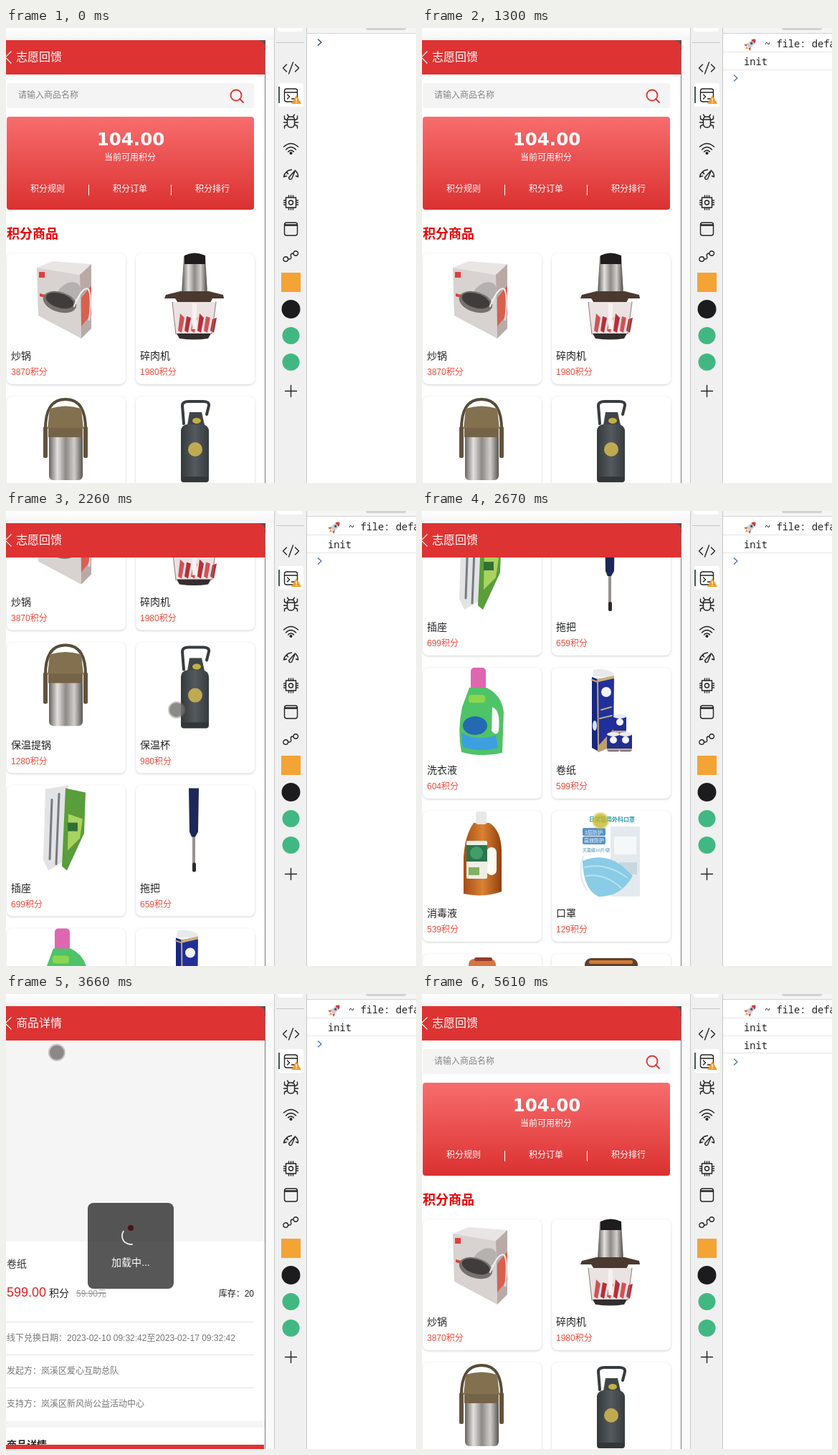
Recreate the animation shown at these times as an HTML page with a canvas. Size 572x636 px, loop 6.08 s.

```html
<!DOCTYPE html>
<html lang="zh">
<head>
<meta charset="utf-8">
<style>
html, body { margin: 0; width: 100%; height: 100%; overflow: hidden; background: #fff; }
canvas { display: block; width: 100vw; height: 100vh; }
</style>
</head>
<body>
<canvas id="stage" width="572" height="636"></canvas>
<script>
const c = document.getElementById('stage').getContext('2d');
const LOOP = 6080;
const SANS = '"Liberation Sans", "Noto Sans CJK SC", "Noto Sans CJK", sans-serif';
const MONO = '"Noto Sans Mono", "DejaVu Sans Mono", monospace';
const RED = '#dd3333';

// Drawing helpers
function rect(x, y, w, h, fill, r = 0) {
  c.fillStyle = fill;
  c.beginPath();
  c.roundRect(x, y, w, h, r);
  c.fill();
}
function disc(x, y, rx, fill, ry = rx, turn = 0) {
  c.fillStyle = fill;
  c.beginPath();
  c.ellipse(x, y, rx, ry, turn, 0, 7);
  c.fill();
}
function shape(path, fill) {
  c.fillStyle = fill;
  c.fill(new Path2D(path));
}
function line(path, color = '#222', width = 1.4) {
  c.strokeStyle = color;
  c.lineWidth = width;
  c.stroke(new Path2D(path));
}
function text(s, x, y, size, fill, { align = 'left', weight = '', font = SANS } = {}) {
  c.font = `${weight} ${size}px ${font}`;
  c.textAlign = align;
  c.fillStyle = fill;
  c.fillText(s, x, y);
}
function fade(stops, x0, y0, x1, y1) {
  const g = c.createLinearGradient(x0, y0, x1, y1);
  stops.forEach((s, i) => g.addColorStop(i / (stops.length - 1), s));
  return g;
}
function at(x, y, scale, draw) {
  c.save();
  c.translate(x, y);
  c.scale(scale, scale);
  draw();
  c.restore();
}

// Piecewise linear track: rows of [time, ...values]
function track(keys, t) {
  if (t <= keys[0][0]) return keys[0].slice(1);
  for (let i = 1; i < keys.length; i++) {
    const a = keys[i - 1], b = keys[i];
    if (t < b[0]) {
      const k = (t - a[0]) / (b[0] - a[0]);
      return a.slice(1).map((v, j) => v + (b[j + 1] - v) * k);
    }
  }
  return keys[keys.length - 1].slice(1);
}

// Product pictures, centred on x = 0 with the top at y = 0
const steel = (x0, x1) => fade(['#66625f', '#e3e1df', '#8d8986', '#d0cecc', '#59544f'], x0, 0, x1, 0);

function panBox() {
  shape('M-40 20L-18 11L36 15L20 30Z', '#e9e5e4');
  shape('M-40 20L20 30L22 119L-38 87Z', '#d8d2d1');
  shape('M20 30L36 15L36 105L22 119Z', '#b9aaa8');
  shape('M22 62L36 45L36 85L22 102Z', '#d9604f');
  rect(-37, 26, 8, 8, '#dc4038');
  shape('M-36 56L-24 59L-24 63L-36 60Z', '#dc4038');
  disc(4, 56, 19, '#b5b1ae', 13, -.7);
  disc(-8, 68, 24, '#77716e', 14, .3);
  disc(-8, 66, 20, '#403c3b', 10, .3);
  line('M12 74Q24 45 32 50Q37 60 33 93', '#eee', 2);
}
function blender() {
  shape('M-15 4Q0 -4 15 4L18 56H-18Z', steel(-17, 17));
  shape('M-14 3Q0 -4 15 3L15 15H-14Z', '#1e1c1c');
  shape('M-40 58L-20 53H20L40 58L41 63H25L22 69H-23L-27 63H-42Z', '#4b3930');
  shape('M-31 68H30L24 113Q0 120 -26 113Z', '#ebe2e2');
  for (let i = 0; i < 6; i++) {
    const x = -23 + i * 9;
    shape(`M${x} 108L${x + 3} ${84 + (i % 3) * 4}L${x + 9} 90L${x + 5} 111Z`, i % 2 ? '#b72f38' : '#cf5258');
  }
  rect(-3, 70, 6, 36, '#f6f2f2');
  shape('M-25 112H23L19 119Q0 122 -21 119Z', '#332e2d');
  line('M-31 68L-26 113M30 68L24 113', '#8b7b75', 1);
}
function foodJar() {
  line('M-28 48Q-29 4 0 4Q29 4 28 48', '#584c3b', 4);
  shape('M-22 17Q0 10 22 17L25 45H-25Z', '#82704f');
  rect(-31, 42, 6, 44, '#62533d', 2);
  rect(25, 42, 6, 44, '#62533d', 2);
  rect(-24, 44, 48, 14, '#756348', 2);
  rect(-23, 57, 47, 60, steel(-23, 24), [0, 0, 6, 6]);
}
function flask() {
  line('M-15 38L-17 13Q-17 7 -8 7H12Q21 7 20 13L17 25', '#383c40', 4);
  shape('M-7 22H10L14 40H-10Z', '#404548');
  disc(3, 34, 6, '#c2b141', 4);
  rect(-19, 39, 39, 81, fade(['#34393c', '#545a5d', '#363b3f'], -19, 0, 20, 0), [9, 9, 4, 4]);
  disc(1, 74, 10, '#c0aa51');
  rect(-18, 112, 37, 8, '#333638', 3);
}
function socket() {
  shape('M-28 5L4 0L0 105L-24 119L-31 104Z', '#e2e3e4');
  line('M-19 20L-22 103M-9 12L-13 110', '#777b80', 3);
  shape('M0 4L28 10L26 67L2 119L-5 113Z', '#5a9d3b');
  shape('M4 40L24 47L20 74L3 91Z', '#a9d35f');
  rect(3, 52, 14, 12, '#317033');
}
function mop() {
  line('M-1 68V113', '#96938f', 4);
  shape('M-8 4H6L5 65L1 72H-4L-7 65Z', '#1d2856');
  rect(-3, 108, 5, 13, '#2e2b28', 2);
}
function detergent() {
  rect(-15, 0, 21, 32, '#df66b1', 5);
  shape('M-17 28L7 28Q28 38 31 62L29 119Q0 126 -28 118Q-34 88 -27 55Z', '#4fc367');
  shape('M15 55Q27 59 24 88Q21 97 14 88Z', '#f9fcf9');
  rect(-18, 38, 23, 11, '#8bd64e', 4);
  disc(-9, 81, 17, '#2469b2', 13);
  shape('M-28 91Q-5 104 20 94L23 112Q0 119 -26 111Z', '#3d9fe0');
}
function roll(x, y) {
  rect(x - 9, y - 12, 18, 25, '#202f92', 3);
  disc(x, y - 11, 9, '#eceaf2', 3);
  disc(x, y - 3, 5, '#f4f4fb');
  rect(x - 9, y + 9, 18, 3, '#c5a770');
}
function tissue() {
  shape('M-25 12L-24 3Q-10 0 4 7L5 14Z', '#e9e9ed');
  shape('M-26 13L-18 16L-17 117L-26 112Z', '#17277f');
  shape('M-18 16L5 12L4 109L-17 118Z', '#202f9b');
  line('M-18 16L-17 117M-26 17L-18 20', '#c4a36b', 2);
  shape('M-17 16L5 11V15L-17 20Z', '#cbae78');
  disc(-6, 34, 7, '#f2f2fb');
  line('M-13 59L1 55M-15 71L2 67', '#bcaa82', 2);
  shape('M-17 109L4 86V109L-17 118Z', '#bea06a');
  disc(-22, 81, 3, '#d8e0f4', 7);
  roll(13, 79);
  roll(4, 104);
  roll(21, 104);
}
function cleaner() {
  shape('M-11 17H11Q27 27 28 55V113Q4 122 -25 116V65Q-23 34 -11 17Z', fade(['#a64d17', '#d98232', '#91400f'], -25, 0, 28, 0));
  rect(-8, 1, 15, 18, '#e8e8e7', 3);
  rect(7, 51, 14, 39, '#fffaf2', 7);
  rect(-21, 42, 29, 53, '#eeeee5', 2);
  rect(-21, 48, 29, 23, '#28764b');
  disc(-7, 59, 9, '#439c6b');
  rect(-18, 79, 15, 11, '#82b25d');
}
function masks() {
  text('日常医用外科口罩', 2, 15, 8, '#2a9cae', { align: 'center', weight: 'bold' });
  rect(-39, 24, 32, 11, '#5793c6', 2);
  rect(-39, 36, 32, 11, '#5793c6', 2);
  text('3层防护', -36, 33, 7, '#fff');
  text('高效防护', -37, 44, 7, '#fff');
  text('灭菌级10片/袋', -39, 57, 6, '#4387a8');
  rect(0, 22, 41, 98, '#e3eaee', 2);
  rect(5, 36, 31, 25, '#f5f7f8');
  rect(12, 72, 25, 17, '#c9d8df');
  line('M-38 64Q-47 90 -33 111', '#ddecf2', 2);
  shape('M-39 70Q-10 58 15 76L31 91Q14 121 -17 120Q-38 110 -39 70Z', '#8acbe6');
  line('M-36 79Q-7 72 23 93M-34 91Q-8 87 15 108', '#b8e2f0', 2);
}
function jar() {
  rect(-18, 7, 38, 30, '#d67443', 8);
  rect(-10, 5, 25, 5, '#943c2b', 3);
}
function lunchBox() {
  rect(-36, 6, 74, 35, '#5d4032', 9);
  rect(-30, 9, 61, 5, '#d37b32', 3);
}

const goods = [
  ['炒锅', 3870, panBox], ['碎肉机', 1980, blender],
  ['保温提锅', 1280, foodJar], ['保温杯', 980, flask],
  ['插座', 699, socket], ['拖把', 659, mop],
  ['洗衣液', 604, detergent], ['卷纸', 599, tissue],
  ['消毒液', 539, cleaner], ['口罩', 129, masks],
  ['收纳罐', 99, jar], ['饭盒', 89, lunchBox]
];

// Phone pages
function header(title) {
  rect(0, 17, 361, 48, RED, [0, 9, 0, 0]);
  line('M7 33L-1 41L7 49', '#fff', 1.2);
  text(title, 14, 46, 16, '#fff');
}
function listPage(scroll, pictures) {
  c.save();
  c.beginPath();
  c.rect(0, 65, 361, 571);
  c.clip();
  c.translate(0, -scroll);
  rect(1, 77, 345, 35, '#f4f4f4', 4);
  text('请输入商品名称', 17, 98, 12, '#858585');
  c.beginPath();
  c.arc(321, 94, 7.5, 0, 7);
  c.strokeStyle = RED;
  c.lineWidth = 1.8;
  c.stroke();
  line('M326 99L331 104', RED, 1.8);

  rect(1, 124, 345, 130, fade(['#f86d6d', '#db3030'], 0, 124, 0, 254), 4);
  const mid = { align: 'center' };
  text('104.00', 174, 164, 24.5, '#fff', { align: 'center', weight: 'bold', font: '"DejaVu Sans", sans-serif' });
  text('当前可用积分', 173, 185, 12, '#fff', mid);
  ['积分规则', '积分订单', '积分排行'].forEach((s, i) => text(s, 58 + i * 115, 229, 12, '#fff', mid));
  rect(115, 219, 1, 15, '#fff');
  rect(230, 219, 1, 15, '#fff');
  text('积分商品', 1, 294, 18, '#e60000', { weight: 'bold' });

  goods.forEach(([name, price, draw], i) => {
    const x = 1 + (i % 2) * 180, y = 315 + (i >> 1) * 200;
    if (y - scroll > 636 || y - scroll < -190) return;
    c.shadowColor = 'rgba(0,0,0,.18)';
    c.shadowBlur = 3;
    c.shadowOffsetY = 1;
    rect(x, y, 166, 183, '#fff', 8);
    c.shadowColor = 'transparent';
    if (pictures) at(x + 82, y, 1, draw);
    text(name, x + 6, y + 148, 14, '#222');
    text(price + '积分', x + 6, y + 170, 12, '#ee4c3c');
  });
  c.restore();
}
function detailPage(picture) {
  rect(0, 65, 361, 281, '#f5f5f5');
  if (picture) {
    rect(68, 65, 211, 281, '#fff');
    at(174, 71, 2.25, tissue);
  }
  disc(174, 327, 4, '#d51b1b');
  text('卷纸', 1, 382, 14, '#333');
  text('599.00', 1, 423, 18, '#e02020');
  text('积分', 60, 423, 14, '#222');
  text('59.90元', 98, 423, 12, '#999');
  rect(98, 418, 42, 1, '#999');
  text('库存：20', 346, 423, 12, '#222', { align: 'right' });
  [
    '线下兑换日期：2023-02-10 09:32:42至2023-02-17 09:32:42',
    '发起方：岚溪区爱心互助总队',
    '支持方：岚溪区新风尚公益活动中心'
  ].forEach((s, i) => {
    rect(1, 458 + i * 46, 345, 1, '#e3e3e3');
    text(s, 1, 485 + i * 46, 12, '#777');
  });
  rect(0, 597, 361, 9, '#f5f5f5');
  text('商品详情', 1, 635, 14, '#222', { weight: 'bold' });
  rect(0, 630, 360, 6, RED);
}
function loader(t, alpha) {
  if (alpha <= 0) return;
  c.save();
  c.globalAlpha = alpha;
  rect(114, 292, 120, 120, 'rgba(17,17,17,.7)', 8);
  const mid = (225 + (t - 880) * .36) * Math.PI / 180;
  c.strokeStyle = '#eee';
  c.lineWidth = 1.8;
  c.beginPath();
  c.arc(174, 338, 12, mid - 1.15, mid + 1.15);
  c.stroke();
  text('加载中...', 147, 380, 14, '#fff');
  c.restore();
}

// Developer tools
function sidebar() {
  rect(374, 0, 46, 636, '#f0f0f0');
  rect(374, 0, 1, 636, '#c9c9c9');
  rect(419, 0, 1, 636, '#c6c6c6');
  rect(379, 0, 35, 5, '#fff', [0, 0, 3, 3]);
  rect(377, 20, 39, 1, '#c4c4c4');
  rect(380, 77, 35, 33, '#fff', 3);
  rect(380, 82, 2, 23, '#3f5c59');
  c.lineCap = c.lineJoin = 'round';
  const icon = (y, path) => at(397.5, y, 1, () => line(path));
  icon(56, 'M-6 -5L-11 0L-6 5M6 -5L11 0L6 5M3 -8L-3 8');
  icon(94, 'M-6 -9H6Q9 -9 9 -6V6Q9 9 6 9H-6Q-9 9 -9 6V-6Q-9 -9 -6 -9M-9 -4H9M-5 -1L-2 2L-5 5M1 5H5');
  shape('M405 94L412 106H398Z', '#f49b25');
  rect(404.4, 98, 1.3, 4, '#fff');
  rect(404.4, 103, 1.3, 1.4, '#fff');
  icon(131, 'M-5 -3Q-5 -7 0 -7Q5 -7 5 -3V3Q5 8 0 8Q-5 8 -5 3ZM-5 -3H5M-3 -7L-5 -10M3 -7L5 -10M-5 -2L-9 -4V-8M5 -2L9 -4V-8M-5 1H-10M5 1H10M-5 4L-9 6V9M5 4L9 6V9');
  icon(169, 'M-10 -3Q0 -12 10 -3M-7 1Q0 -6 7 1M-4 4Q0 0 4 4');
  disc(397.5, 175, 2, '#222');
  icon(205, 'M-10 3Q-8 -6 1 -7M7 -5Q10 -2 10 3M-10 3L-6 2M-6 -4L-4 -1M6 -6L1 6Q-2 8 -3 4ZM7 2L10 3');
  icon(244, 'M-7 -7H7V7H-7ZM-3 -10V-7M0 -10V-7M3 -10V-7M-3 10V7M0 10V7M3 10V7M-10 -3H-7M-10 0H-7M-10 3H-7M10 -3H7M10 0H7M10 3H7M3 0A3 3 0 1 1 -3 0A3 3 0 1 1 3 0');
  icon(281, 'M-6 -9H6Q9 -9 9 -6V6Q9 9 6 9H-6Q-9 9 -9 6V-6Q-9 -9 -6 -9ZM-9 -5H9M-9 -6H9');
  icon(319, 'M-4 4A3.3 3.3 0 1 1 -10.6 4A3.3 3.3 0 1 1 -4 4M10 -4A3.3 3.3 0 1 1 3.4 -4A3.3 3.3 0 1 1 10 -4M-4 4H-2Q1 4 0 0Q-1 -4 3 -4');
  rect(384, 342, 27, 27, '#f4a335');
  disc(397.5, 393, 13, '#1c1c1e');
  disc(397.5, 430, 12, '#41b883');
  disc(397.5, 467, 12, '#41b883');
  icon(507.5, 'M-8 0H8M0 -8V8');
}
function rocket() {
  c.rotate(Math.PI / 4);
  shape('M-3 3L-6 8L-2 7ZM3 3L6 8L2 7Z', '#c63c35');
  shape('M0 -9Q5 -4 3 6H-3Q-5 -4 0 -9Z', '#c9ccd2');
  shape('M0 -9Q3 -7 3.5 -4H-3.5Q-3 -7 0 -9Z', '#d03b35');
  disc(0, -1, 1.7, '#3a5878');
  shape('M-2 7H2L0 11Z', '#f0a030');
}
function consolePane(rows) {
  rect(420, 0, 152, 636, '#fff');
  rect(420, 0, 152, 7, '#f5f5f5');
  rect(420, 7, 152, 1, '#d3d3d3');
  rect(502, -3, 56, 6, '#d2d2d2', 3);
  const mono = { font: MONO };
  if (rows) {
    at(459, 22, 1, rocket);
    text('~ file: defa', 478, 27, 13.7, '#222', mono);
  }
  for (let i = 1; i < rows; i++) text('init', 449, 27 + i * 25, 13.7, '#222', mono);
  for (let i = 0; i < rows; i++) rect(420, 33 + Math.round(i * 24.5), 152, 1, '#e6e6e6');
  const y = [20, 45, 70, 95][rows];
  line(`M435.5 ${y - 4}L440 ${y}L435.5 ${y + 4}`, rows ? '#4778bd' : '#2c4f7c', 1.5);
}

// Timeline
const scrollKeys = [
  [1930, 0], [2000, 8], [2070, 39], [2140, 140], [2260, 330],
  [2400, 530], [2530, 650], [2660, 696], [3100, 696]
];
const pointerKeys = [
  [1400, 350, 300], [1720, 240, 445], [1930, 236, 442], [2070, 235, 403],
  [2200, 236, 250], [2600, 249, 433], [2800, 249, 433], [2950, 258, 300],
  [3100, 258, 300], [3660, 71, 82], [3930, 38, 40], [4740, 38, 40],
  [5140, 182, 170], [5560, 470, 640]
];
const loaderKeys = [
  [780, 0], [880, .8], [940, 1], [1100, 1], [1230, 0],
  [3100, 0], [3220, 1], [3760, 1], [3880, 0],
  [4740, 0], [4840, 1], [5000, 1], [5120, 0]
];
const presses = [[1900, 2200], [2640, 2800], [3000, 3100], [4600, 4700]];

function pointer(t) {
  if (t < 1400 || t > 5560) return;
  const [x, y] = track(pointerKeys, t);
  const down = presses.some(([a, b]) => t >= a && t < b);
  disc(x, y, 12, down ? 'rgba(205,195,65,.5)' : 'rgba(145,125,125,.45)');
  disc(x, y, 10, down ? 'rgba(190,180,35,.6)' : 'rgba(112,112,112,.7)');
}

function render(t) {
  c.clearRect(0, 0, 572, 636);
  rect(0, 0, 374, 636, '#fafafa');
  rect(0, 0, 374, 17, fade(['#fff', '#f4f4f4'], 0, 0, 0, 17));
  rect(0, 17, 362, 619, '#777');
  rect(348, 17, 14, 14, '#555');
  rect(0, 18, 361, 618, '#fff', [0, 9, 0, 0]);

  const reloading = t >= 530 && t < 1090;
  const detail = t >= 3100 && t < 4740;
  if (detail) {
    detailPage(t >= 3800);
    header('商品详情');
  } else if (!reloading) {
    const ready = t < 530 || (t >= 1160 && t < 4740) || t >= 4880;
    const pictures = t < 530 || (t >= 1300 && t < 4740) || t >= 5070;
    if (ready) listPage(t < 3100 ? track(scrollKeys, t)[0] : 0, pictures);
    header('志愿回馈');
  }
  loader(t, track(loaderKeys, t)[0]);
  sidebar();
  consolePane(t < 950 ? 0 : t < 4880 ? 2 : 3);
  pointer(t);
}

const start = performance.now();
function tick() {
  render((performance.now() - start) % LOOP);
  requestAnimationFrame(tick);
}
tick();
</script>
</body>
</html>
```
